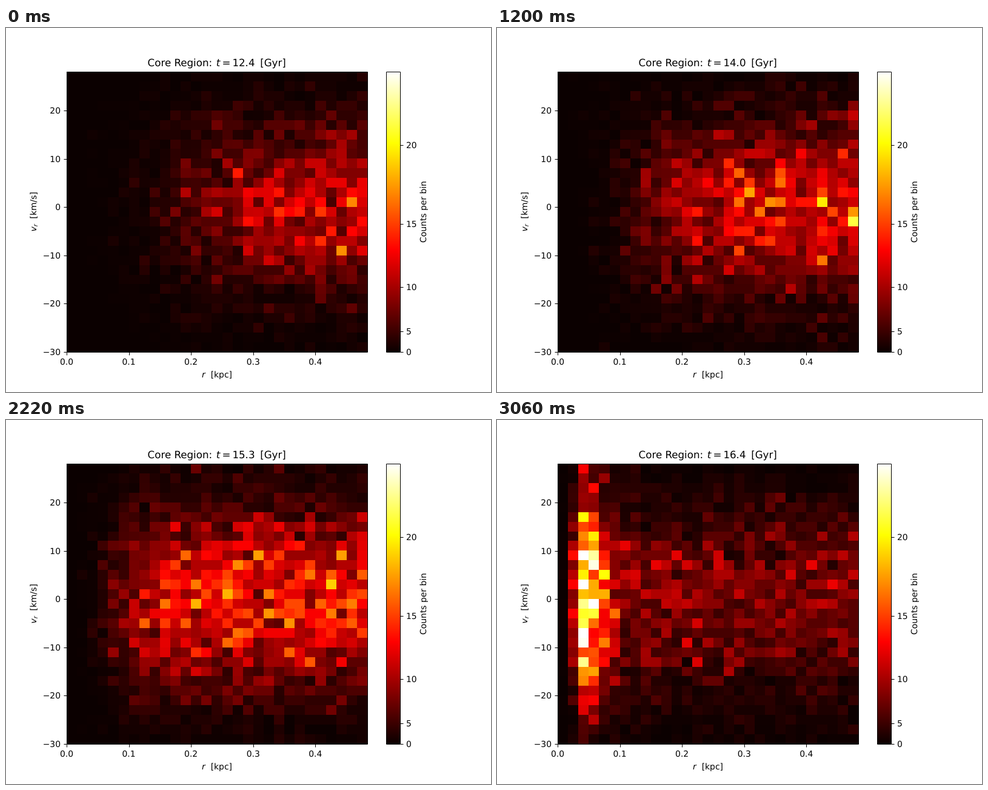
Recreate the animation shown at these times as an HTML page with a canvas. Size 800 px wide and 600 px high, loop 3.12 s.

```html
<!DOCTYPE html>
<html lang="en">
<head>
<meta charset="utf-8">
<title>Core Region</title>
<style>
  html, body { margin: 0; width: 100%; height: 100%; overflow: hidden; background: #fff; }
  canvas, svg { position: absolute; left: 0; top: 0; }
  text { font: 13.89px "DejaVu Sans", sans-serif; white-space: pre; text-rendering: geometricPrecision; }
  .title text { font-size: 16.67px; }
  .math { font-style: italic; }
  .sub { font-size: 9.72px; }
  path { stroke: #000; fill: none; }
</style>
</head>
<body>
<canvas id="heat" width="800" height="600"></canvas>
<svg id="plot" width="800" height="600">
  <path d="M100.5 72.5h496v462h-496zM627.5 72.5h23v462h-23z"/>
  <g class="title">
    <text x="233.6" y="63">Core Region:</text>
    <text class="math" x="346.7" y="63">t</text>
    <text x="356.4" y="63">=</text>
    <text x="373.4" y="63" id="time">12.4</text>
    <text x="419.2" y="63">[Gyr]</text>
  </g>
  <text x="323.1" y="576"><tspan class="math">r</tspan>  [kpc]</text>
  <text transform="translate(50 335.5) rotate(-90)"><tspan class="math">v</tspan><tspan class="math sub" dy="2">r</tspan><tspan dy="-2">  [km/s]</tspan></text>
  <text transform="translate(693 303) rotate(-90)" text-anchor="middle">Counts per bin</text>
</svg>
<script>
const N = 29, LEFT = 100, TOP = 72, W = 496, H = 462;
const STEP = 60, FRAMES = 52, MAX = 24, GAMMA = 5 / 3, NOISE = .75;
const ctx = document.getElementById('heat').getContext('2d');
const plot = document.getElementById('plot');
const timeLabel = document.getElementById('time');

const clamp = x => Math.max(0, Math.min(1, x));

// Black, red, yellow, white.
function hot(x) {
  const r = .0416 + .9584 * x / .365, g = (x - .365) / .381, b = (x - .746) / .254;
  return `rgb(${[r, g, b].map(c => Math.round(255 * clamp(c)))})`;
}

const level = n => clamp(n / MAX) ** GAMMA;

function generator(seed) {
  return () => {
    seed = seed + 0x6D2B79F5 | 0;
    let h = Math.imul(seed ^ seed >>> 15, 1 | seed);
    h = h + Math.imul(h ^ h >>> 7, 61 | h) ^ h;
    return ((h ^ h >>> 14) >>> 0) / 4294967296;
  };
}

function poisson(mean, random) {
  const limit = Math.exp(-mean);
  let n = 0;
  for (let p = random(); p > limit; p *= random()) n++;
  return n;
}

// Core collapse: the empty core shrinks while a cusp grows at its edge.
function meanCount(u, r, v) {
  const core = 1.5 + 10.8 * (1 - u) ** .8;
  const x = r / core;
  const shell = (12.8 + 2 * u - 6.5 * u ** 6) * x ** 2.5 / (1 + x ** 2.5);
  const cusp = 17 * u ** 8 * Math.exp(-3 * Math.log(x / 1.8) ** 2);
  const sigma = 14 + u + cusp / 8;
  return (shell + cusp) * Math.exp(-v * v / (2 * sigma * sigma));
}

function drawHeat(frame) {
  const u = frame / (FRAMES - 1), random = generator(frame * 7919 + 17);
  const xAt = i => Math.round(LEFT + i * W / N), yAt = i => Math.round(TOP + i * H / N);
  for (let row = 0; row < N; row++) {
    for (let col = 0; col < N; col++) {
      const mean = meanCount(u, col + .5, 27 - 2 * row);
      const count = mean + NOISE * (poisson(mean, random) - mean);
      ctx.fillStyle = hot(level(count));
      ctx.fillRect(xAt(col), yAt(row), xAt(col + 1) - xAt(col), yAt(row + 1) - yAt(row));
    }
  }
}

function drawBar() {
  for (let y = 0; y < H; y++) {
    ctx.fillStyle = hot(1 - y / (H - 1));
    ctx.fillRect(627, TOP + y, 23, 1);
  }
}

function tick(x, y, dx, dy, label, tx, ty, anchor) {
  plot.insertAdjacentHTML('beforeend',
    `<path d="M${x} ${y}l${dx} ${dy}"/><text x="${tx}" y="${ty}" text-anchor="${anchor}">${label}</text>`);
}

function drawTicks() {
  for (let i = 0; i < 5; i++) {
    const x = LEFT + i * 102.56;
    tick(Math.round(x) + .5, 535, 0, 4.5, (i / 10).toFixed(1), x, 555, 'middle');
  }
  for (let v = -30; v <= 20; v += 10) {
    const y = Math.round(295.2 - v * 7.96);
    tick(100, y + .5, -4.5, 0, String(v).replace('-', '\u2212'), 90, y + 5, 'end');
  }
  for (let n = 0; n <= 20; n += 5) {
    const y = Math.round(TOP + H * (1 - level(n)));
    tick(651, y + .5, 4.5, 0, n, 660, y + 5, 'start');
  }
}

let shown = -1;
const start = performance.now();

function play() {
  const frame = Math.floor((performance.now() - start) / STEP) % FRAMES;
  if (frame !== shown) {
    shown = frame;
    drawHeat(frame);
    timeLabel.textContent = (12.4 + 4 * frame / (FRAMES - 1)).toFixed(1);
  }
  requestAnimationFrame(play);
}

drawBar();
drawTicks();
play();
</script>
</body>
</html>
```
